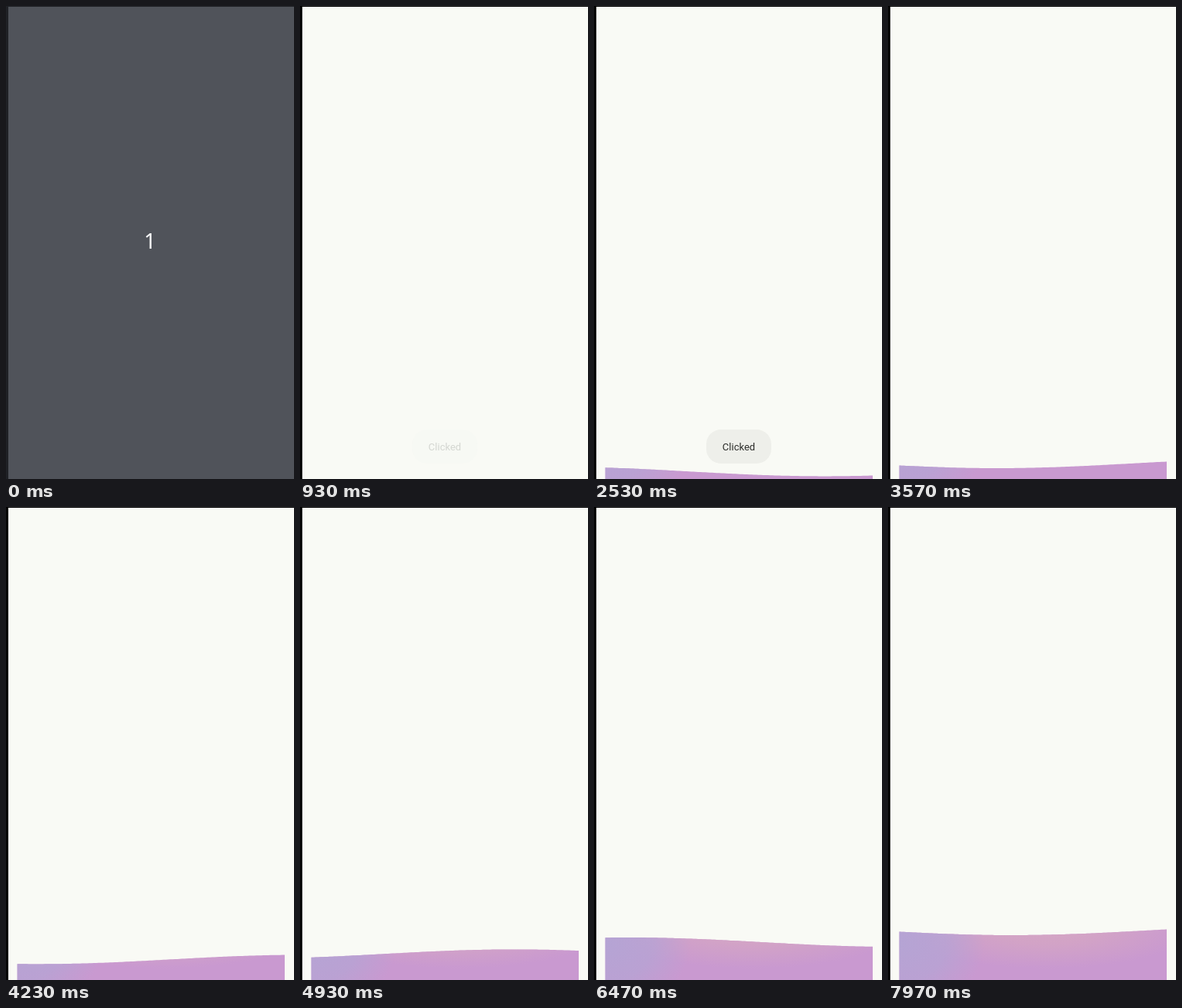
Recreate the animation shown at these times as an HTML page with a canvas. Size 372x612 px, loop 8 s.

```html
<!DOCTYPE html>
<html lang="en">
<head>
<meta charset="utf-8">
<title>Rising wave</title>
<style>
  html, body { margin: 0; width: 100%; height: 100%; overflow: hidden; background: #f9faf5; }
  canvas { display: block; width: 372px; height: 612px; }
</style>
</head>
<body>
<canvas id="stage" width="372" height="612"></canvas>
<script>
const W = 372, H = 612, LOOP = 8000;
const ctx = document.getElementById('stage').getContext('2d');

const wave = {
  left: 14.6, right: 360, amp: 6, length: 690,
  level: t => 548 + (7970 - t) * 0.01,
  trough: t => 140 - (t - 3570) * 0.1523
};

const clamp = v => Math.max(0, Math.min(1, v));
const ramp = (t, from, to) => clamp((t - from) / (to - from));

function label(text, x, y, font, color) {
  ctx.font = font;
  ctx.fillStyle = color;
  ctx.textAlign = 'center';
  ctx.textBaseline = 'alphabetic';
  ctx.fillText(text, x, y);
}

function screen(paper, edge) {
  ctx.fillStyle = edge;
  ctx.fillRect(0, 0, W, H);
  ctx.fillStyle = paper;
  ctx.fillRect(3, 1, W - 3, H - 1);
}

// Soft elliptical spot of colour, given as "r,g,b"
function glow(x, y, rx, ry, rgb, core) {
  ctx.save();
  ctx.translate(x, y);
  ctx.scale(rx, ry);
  const g = ctx.createRadialGradient(0, 0, 0, 0, 0, 1);
  g.addColorStop(0, `rgba(${rgb},1)`);
  g.addColorStop(core, `rgba(${rgb},.75)`);
  g.addColorStop(1, `rgba(${rgb},0)`);
  ctx.fillStyle = g;
  ctx.fillRect(-1, -1, 2, 2);
  ctx.restore();
}

function drawWave(t) {
  const level = wave.level(t), trough = wave.trough(t);
  const k = 2 * Math.PI / wave.length;
  const surface = x => level + wave.amp * Math.cos(k * (x - trough));

  ctx.save();
  ctx.beginPath();
  ctx.moveTo(wave.left, H + 10);
  for (let x = wave.left; x < wave.right; x += 3) ctx.lineTo(x, surface(x));
  ctx.lineTo(wave.right, surface(wave.right));
  ctx.lineTo(wave.right, H + 10);
  ctx.clip();
  ctx.fillStyle = '#c999d0';
  ctx.fillRect(0, 500, W, H - 500);
  glow(205, 545, 190, 52, '213,166,195', 0.4);
  glow(15, 565, 110, 90, '181,164,212', 0.55);
  ctx.restore();
}

function drawToast(t) {
  const alpha = ramp(t, 905, 1055) * (1 - ramp(t, 2950, 3070));
  if (!alpha) return;
  ctx.save();
  ctx.globalAlpha = alpha;
  ctx.fillStyle = '#eeefea';
  ctx.beginPath();
  ctx.roundRect(145, 548, 84, 44, 19);
  ctx.fill();
  label('Clicked', 187, 575, '13px Roboto, sans-serif', '#2c2d2a');
  ctx.restore();
}

function draw(t) {
  if (t < 30) {
    screen('#50535a', '#1f2126');
    label('1', 186, 314, '27px "Noto Sans", "Open Sans", sans-serif', '#fff');
    return;
  }
  screen('#f9faf5', '#000');
  if (t >= 930) drawWave(t);
  drawToast(t);
}

let start;
function tick(now) {
  if (start === undefined) start = now;
  draw((now - start) % LOOP);
  requestAnimationFrame(tick);
}
draw(0);
requestAnimationFrame(tick);
</script>
</body>
</html>
```
